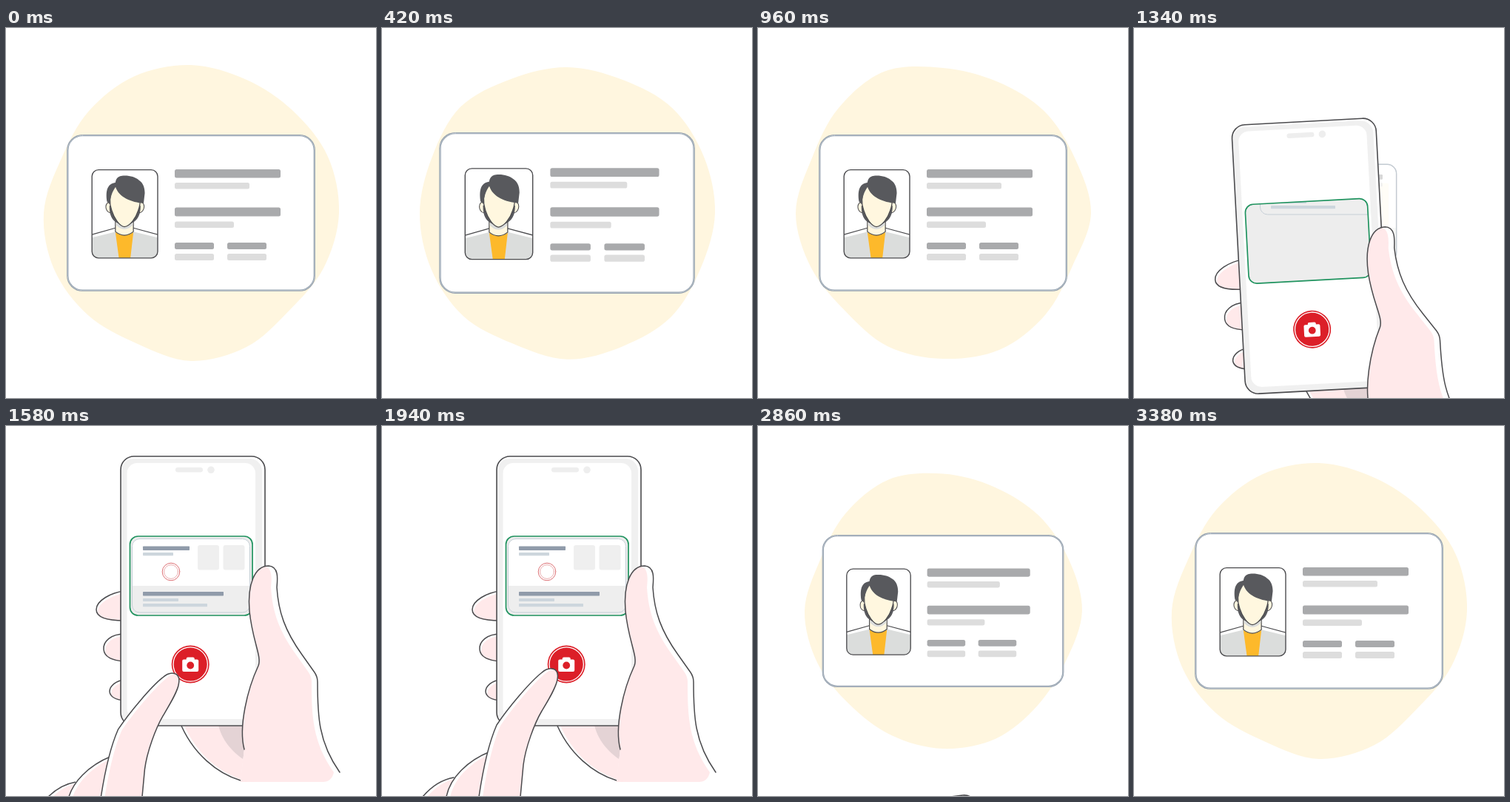
These frames come from a looping animation (500 by 500 pixels, 3400 ms). An HTML page with a canvas:

```html
<!DOCTYPE html>
<html lang="en">
<head>
<meta charset="utf-8">
<title>Card capture</title>
<style>
  html, body { margin: 0; width: 100%; height: 100%; overflow: hidden; background: #fff; }
  canvas { display: block; width: 500px; height: 500px; }
</style>
</head>
<body>
<canvas id="stage" width="500" height="500"></canvas>
<script>
const ctx = document.getElementById('stage').getContext('2d');
const LOOP = 3400;
const INK = '#4b4b4e', SKIN = '#ffe9ea', RED = '#dc1f28';
const HAIR = '#58595d', FACE = '#fff7df';
const DARK_BAR = '#a9aaac', PALE_BAR = '#dddddd';

const clamp = v => Math.min(1, Math.max(0, v));
const span = (t, from, to) => clamp((t - from) / (to - from));
const smooth = v => (1 - Math.cos(Math.PI * v)) / 2;
const easeOut = v => 1 - (1 - v) ** 3;
const mix = (a, b, k) => a + (b - a) * k;

function box(x, y, w, h, r, fill, stroke, line = 1.5) {
  ctx.beginPath();
  ctx.roundRect(x, y, w, h, r);
  paint(fill, stroke, line);
}

function disc(x, y, r, fill, stroke, line = 1.5) {
  ctx.beginPath();
  ctx.arc(x, y, r, 0, Math.PI * 2);
  paint(fill, stroke, line);
}

function paint(fill, stroke, line) {
  if (fill) { ctx.fillStyle = fill; ctx.fill(); }
  if (stroke) { ctx.strokeStyle = stroke; ctx.lineWidth = line; ctx.stroke(); }
}

function shape(d, fill, stroke, line = 1.5) {
  const path = new Path2D(d);
  if (fill) { ctx.fillStyle = fill; ctx.fill(path); }
  if (stroke) { ctx.strokeStyle = stroke; ctx.lineWidth = line; ctx.stroke(path); }
}

function group(draw) {
  ctx.save();
  draw();
  ctx.restore();
}

// White shape with a shifted skin fill, leaving a highlight along one side.
function skin(d, dx, dy) {
  const path = new Path2D(d);
  ctx.fillStyle = '#fff';
  ctx.fill(path);
  group(() => {
    ctx.clip(path);
    ctx.translate(dx, dy);
    ctx.fillStyle = SKIN;
    ctx.fill(path);
  });
}

// Blob radii, clockwise from the right in steps of 22.5 degrees.
const ROUND = [200, 194, 187, 196, 200, 191, 196, 200, 199, 190, 195, 200, 200, 195, 195, 200];
const WIDE = [200, 196, 203, 195, 197, 191, 198, 198, 199, 200, 206, 195, 196, 195, 203, 200];
const TILTED = [200, 189, 195, 200, 197, 195, 187, 193, 199, 192, 200, 207, 196, 192, 194, 193];
const BLOB_KEYS = [[0, ROUND], [640, WIDE], [960, TILTED], [2500, TILTED], [LOOP, ROUND]];

function drawBlob(t, scale) {
  const i = BLOB_KEYS.findIndex((key, n) => n > 0 && t <= key[0]);
  const [t0, from] = BLOB_KEYS[i - 1], [t1, to] = BLOB_KEYS[i];
  const k = smooth(span(t, t0, t1));
  const count = from.length;
  const point = n => {
    const j = (n + count) % count, a = j * Math.PI * 2 / count;
    const r = mix(from[j], to[j], k) * scale;
    return [250 + r * Math.cos(a), 250 + r * Math.sin(a)];
  };
  ctx.beginPath();
  ctx.moveTo(...point(0));
  for (let n = 0; n < count; n++) {
    const [a, b, c, d] = [-1, 0, 1, 2].map(o => point(n + o));
    ctx.bezierCurveTo(b[0] + (c[0] - a[0]) / 6, b[1] + (c[1] - a[1]) / 6,
      c[0] - (d[0] - b[0]) / 6, c[1] - (d[1] - b[1]) / 6, c[0], c[1]);
  }
  paint('#fff6df');
}

function drawPortrait() {
  ctx.translate(250, 250);
  ctx.scale(0.811, 0.811);
  ctx.translate(-250, -250);
  group(() => {
    box(85, 178, 109.5, 147, 11, '#fff');
    ctx.clip();
    shape('M85 291L125 281H154L195 291V326H85Z', '#dbdddc');
    shape('M124 282Q139 292 154 282L149 326H130Z', '#fdb92b');
    shape('M85 286L124 275M154 275L195 286', null, INK);
    shape('M124 258V281Q139 293 154 281V258Z', FACE, INK);
    shape('M125 262Q139 280 153 262V270Q139 284 125 270Z', '#dbdddc');
    shape('M116 232C106 230 105 248 116 250ZM164 232C175 230 174 248 164 250Z', FACE, INK, 1.3);
    shape('M114 238C114 254 118 262 128 267L139 273L151 267C161 262 166 254 166 238Z', HAIR);
    shape('M121 206C114 220 114 235 118 246C122 259 131 272 139 273C148 272 158 259 162 246Q166 236 165 226L140 205Z',
      FACE, INK);
    shape('M126 199C112 200 107 210 110 231L115 236C115 224 119 214 124 207Z', HAIR);
    shape('M124 206C123 196 126 189 135 188C147 187 157 190 163 195C171 200 173 209 173 217L171 234' +
      'C151 232 130 225 124 206Z', HAIR);
  });
  box(85, 178, 109.5, 147, 11, null, INK, 1.7);
}

function drawCardFront() {
  box(228, 191, 143, 11.5, 2.5, DARK_BAR);
  box(228, 209, 101, 8.5, 2.5, PALE_BAR);
  box(228, 242.5, 143, 12, 2.5, DARK_BAR);
  box(228, 261.5, 80, 8.5, 2.5, PALE_BAR);
  for (const x of [228, 299]) {
    box(x, 290, 53, 9, 2.5, DARK_BAR);
    box(x, 305, 53, 9, 2.5, PALE_BAR);
  }
  group(drawPortrait);
}

function drawCardBack() {
  box(84, 282, 332, 71, [0, 0, 19, 19], '#f6f7f6');
  box(370, 186, 30, 96, 3, '#fffdf6');
  box(300, 167, 87, 11, 2, '#cdcdce');
  box(300, 185, 87, 8, 2, '#efefef');
  box(300, 296, 87, 12, 2, '#dcdcdd');
}

function drawCard(t, shown) {
  const pulse = smooth(span(t, 380, 580)) - smooth(span(t, 580, 780));
  const scale = 0.55 + 0.45 * shown + 0.29 * pulse;
  const front = span(shown, 0.25, 0.9);
  group(() => {
    ctx.translate(250, 250);
    ctx.scale(scale, scale);
    ctx.translate(-250, -250);
    box(83, 145, 334, 210, 20, '#fff');
    ctx.globalAlpha = (1 - front) * 0.8;
    if (front < 1) drawCardBack();
    ctx.globalAlpha = front;
    if (front > 0) drawCardFront();
    ctx.globalAlpha = 0.55 + 0.45 * front;
    box(83.3, 145.2, 333.5, 209.5, 20, null, '#8c99a8', 2.3);
    box(83.3, 145.2, 333.5, 209.5, 20, null, '#d0d8de', 0.7);
  });
}

const FINGERS = [
  'M160 223C142 225 122 236 122 248C122 260 142 263 160 263',
  'M160 281C142 281 131 291 132 302C133 313 145 317 160 318',
  'M160 343C149 344 140 351 140 359C141 367 149 370 160 371'
];
const PALM = 'M234 398C252 444 287 470 317 479';
const THUMB = 'M322 437C314 407 326 356 341 324C346 311 333 291 329 250C326 214 336 189 355 189' +
  'C369 190 367 207 366 218C368 251 377 277 400 309L417 333Q421 339 421 346C421 391 422 427 451 468';

function drawBackHand() {
  for (const d of FINGERS) {
    skin(d + 'Z', 2, 3);
    shape(d, null, INK);
  }
  skin(PALM + 'L345 481L345 398Z', 4, 0);
  shape('M286 400C291 425 305 441 329 456L321 400Z', '#e4d3d5');
  shape(PALM, null, INK);
}

function drawThumb() {
  skin(THUMB + 'Q448 481 436 481H317Z', -8, 0);
  shape('M317 479L336 481H346L329 456L322 437Z', SKIN);
  shape(THUMB, null, INK);
}

function drawPhone() {
  box(155, 41, 195, 364, 18, '#fff');
  box(156, 44, 190, 360, 17, '#f0f0f0');
  box(163.5, 50, 173.5, 346, 14, '#fff');
  box(155, 41, 195, 364, 18, null, INK, 1.6);
  box(229, 56, 37, 6.5, 3.2, '#eeeeee');
  disc(277, 59.3, 4.8, '#eeeeee');
}

function drawDocument() {
  group(() => {
    box(170.5, 152.5, 159, 99.5, 10, '#fff');
    ctx.clip();
    ctx.fillStyle = '#eeeeee';
    ctx.fillRect(170, 216, 161, 37);
  });
  box(170.5, 152.5, 159, 99.5, 10, null, '#c5ced6', 1);
  const bar = (x, y, w, h, color) => box(x, y, w, h, 0.8, color);
  bar(185, 162.5, 63, 5.5, '#909baa');
  bar(185, 171, 41, 4.3, '#cdd6dd');
  bar(185, 224, 109, 5.5, '#909baa');
  bar(185, 233, 48, 4, '#cdd6dd');
  bar(185, 240, 87, 4.2, '#cdd6dd');
  box(259, 161, 29, 33.5, 3, '#efefef');
  box(293.5, 161, 29, 33.5, 3, '#efefef');
  disc(223, 197, 11.8, null, '#dd7175', 1);
  disc(223, 197, 9.4, null, '#e59a9c', 0.8);
}

function drawButton(press) {
  group(() => {
    ctx.translate(249.2, 322);
    ctx.scale(1 - 0.06 * press, 1 - 0.06 * press);
    disc(0, 0, 25.5, RED);
    disc(0, 0, 23.2, null, '#fff', 1.3);
    box(-5.5, -9.5, 11, 7, 2, '#fff');
    box(-11, -6.5, 22, 16.5, 2, '#fff');
    disc(0, 1.5, 4.9, RED);
  });
}

const TAP_FINGERS = [
  'M55 501C66 488 80 478 97 475',
  'M87 501C92 475 116 452 146 440',
  'M131 501C136 467 144 429 155 404C171 380 200 346 215 334C226 324 240 326 237 342' +
    'C236 352 225 370 216 385C206 402 194 434 191 458L187 501'
];
const TAP_CLOSE = ['L130 480V560H20Z', 'L160 480V560H70Z', 'L183 560H121Z'];

function drawTapHand(shift, press) {
  group(() => {
    ctx.translate(-110 * shift + 6 * press, 190 * shift - 4 * press);
    TAP_FINGERS.forEach((d, i) => {
      skin(d + TAP_CLOSE[i], 5, 1);
      shape(d, null, INK);
    });
  });
}

// Pose of the phone and the hand holding it; away is 1 when off stage.
function placePhone(away) {
  ctx.translate(250 - 36 * away, 202.5 + 497 * away * away);
  ctx.rotate(-7.4 * away * Math.PI / 180);
  ctx.translate(-250, -202.5);
}

function drawCapture(away, press) {
  const place = draw => group(() => { placePhone(away); draw(); });
  place(() => {
    drawBackHand();
    drawPhone();
    box(167.5, 149, 165.5, 107, 11, '#ededed');
  });
  // The paper stays put while the viewfinder slides over it.
  group(() => {
    const still = ctx.getTransform();
    placePhone(away);
    ctx.beginPath();
    ctx.roundRect(167.5, 149, 165.5, 107, 11);
    ctx.clip();
    ctx.setTransform(still);
    drawDocument();
  });
  place(() => {
    box(167.5, 149, 165.5, 107, 11, null, '#20935f', 1.7);
    drawButton(press);
    drawThumb();
  });
}

function render(t) {
  const entered = span(t, 977, 1477) - span(t, 2440, 2940);
  const away = Math.cos(Math.PI / 2 * entered);
  const shown = away * away;
  const press = smooth(span(t, 1680, 1780)) - smooth(span(t, 1780, 1900));
  const tapAway = 1 - easeOut(span(t, 1370, 1680)) + smooth(span(t, 2210, 2480));

  ctx.fillStyle = '#fff';
  ctx.fillRect(0, 0, 500, 500);
  if (shown > 0.01) drawBlob(t, shown);
  drawCard(t, shown);
  if (away < 1) drawCapture(away, press);
  if (tapAway < 1) drawTapHand(tapAway, press);
}

ctx.lineCap = ctx.lineJoin = 'round';
const start = performance.now();
function tick() {
  render((performance.now() - start) % LOOP);
  requestAnimationFrame(tick);
}
tick();
</script>
</body>
</html>
```
